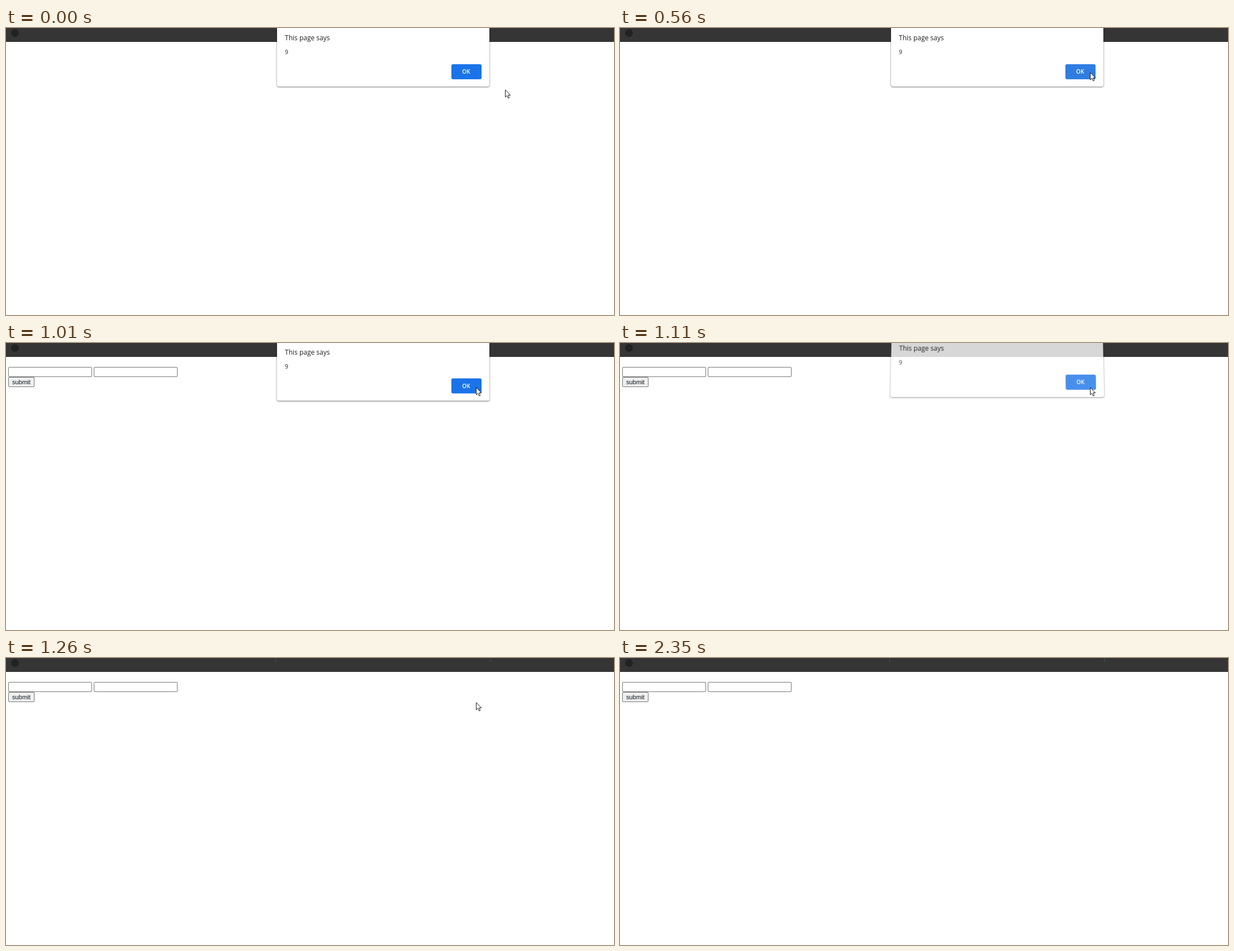
An HTML page that plays this animation: 1088x515 px, repeating every 3350 ms.

```html
<!DOCTYPE html>
<html lang="en">
<head>
<meta charset="utf-8">
<title>Alert</title>
<style>
  html, body { margin: 0; width: 100%; height: 100%; overflow: hidden; background: #fff; }
  #stage { position: relative; width: 1088px; height: 515px; overflow: hidden; background: #fff; }
  #stage * { position: absolute; box-sizing: border-box; }
  .anim { animation: 3350ms step-end infinite; }

  .bar { left: 0; top: 0; width: 1088px; height: 25px; background: #353535; }
  .dot { left: 9px; top: 2px; width: 14px; height: 14px; border-radius: 50%; background: #222; }
  .tick { top: 0; width: 1px; height: 8px; background: #3c5452; animation-name: tick; }

  .form { left: 0; top: 0; animation-name: form; }
  .field, .submit { height: 18px; border: 1px solid #767676; border-radius: 2px; }
  .field { top: 43px; width: 150px; background: #fff; }
  .submit {
    left: 4px; top: 61px; width: 47px; background: #efefef; color: #0a1420;
    font: 11.2px/16px "Liberation Sans", Arial, sans-serif; text-align: center;
  }

  /* starts above the stage so its top edge stays hidden */
  .dialog {
    left: 485px; top: -20px; width: 379.5px; height: 125px;
    background: #fff; border-radius: 3px; color: #202124;
    box-shadow: 0 1px 3px rgba(0, 0, 0, .5), 0 0 1px rgba(0, 0, 0, .35);
    font: 12px/20px "Open Sans", "Noto Sans", sans-serif;
    animation-name: dialog;
  }
  .title { left: 14px; top: 28px; white-space: nowrap; }
  .value { left: 14px; top: 53px; font-size: 10.5px; }
  .ok {
    left: 312px; top: 84.5px; width: 54px; height: 27px; padding-right: 1px;
    border-radius: 3px; background: #1a73e8; color: #fff;
    font-size: 10px; font-weight: 600; line-height: 27px; text-align: center;
    animation-name: hover;
  }

  .cursor { left: 0; top: 0; width: 11px; height: 17px; animation-name: cursor; }

  @keyframes hover {
    0% { background: #1a73e8; }
    16.71% { background: #307de1; }
    28.05%, 100% { background: #1a73e8; }
  }
  @keyframes form {
    0% { visibility: hidden; }
    28.05%, 100% { visibility: visible; }
  }
  @keyframes tick {
    0% { visibility: hidden; }
    37.61%, 100% { visibility: visible; }
  }
  @keyframes dialog {
    0% { transform: none; opacity: 1; }
    30.14% { transform: translateY(-1.5px); opacity: 1; }
    33.13% { transform: translateY(-8.3px) perspective(500px) rotateX(3deg); opacity: .8; }
    35.22% { transform: translateY(-14px) perspective(500px) rotateX(5deg); opacity: .3; }
    37.61%, 100% { transform: translateY(-18px); opacity: 0; }
  }
  @keyframes cursor {
    0% { transform: translate(893px, 110px); }
    2.08% { transform: translate(891px, 109px); }
    4.47% { transform: translate(885px, 105px); }
    6.86% { transform: translate(875px, 98px); }
    9.25% { transform: translate(863px, 91px); }
    11.94% { transform: translate(852px, 85px); }
    14.32% { transform: translate(845px, 81px); }
    16.71% { transform: translate(841px, 79px); }
    42.08% { transform: translate(848px, 130px); }
    44.47% { transform: translate(866px, 255px); }
    46.86% { transform: translate(880px, 353px); }
    51.64% { transform: translate(901px, 367px); }
    54.02% { transform: translate(-50px, 0); }
    62.98% { transform: translate(1044px, 513px); }
    65.37% { transform: translate(1040px, 512px); }
    67.76% { transform: translate(1036px, 513px); }
    70.14%, 100% { transform: translate(-50px, 0); }
  }
</style>
</head>
<body>
<div id="stage">
  <div class="bar"></div>
  <div class="dot"></div>
  <div class="tick anim" style="left:482px"></div>
  <div class="tick anim" style="left:867px"></div>

  <div class="form anim">
    <div class="field" style="left:4px"></div>
    <div class="field" style="left:157px"></div>
    <div class="submit">submit</div>
  </div>

  <div class="dialog anim">
    <span class="title">This page says</span>
    <span class="value">9</span>
    <div class="ok anim">OK</div>
  </div>

  <svg class="cursor anim" viewBox="0 0 11 17">
    <path d="M.5 .9V14L3.5 11.3L5.6 16L7.7 15.1L5.7 10.5H9.7Z" fill="#fff" stroke="#1c1c22" stroke-width="1"/>
  </svg>
</div>
</body>
</html>
```
